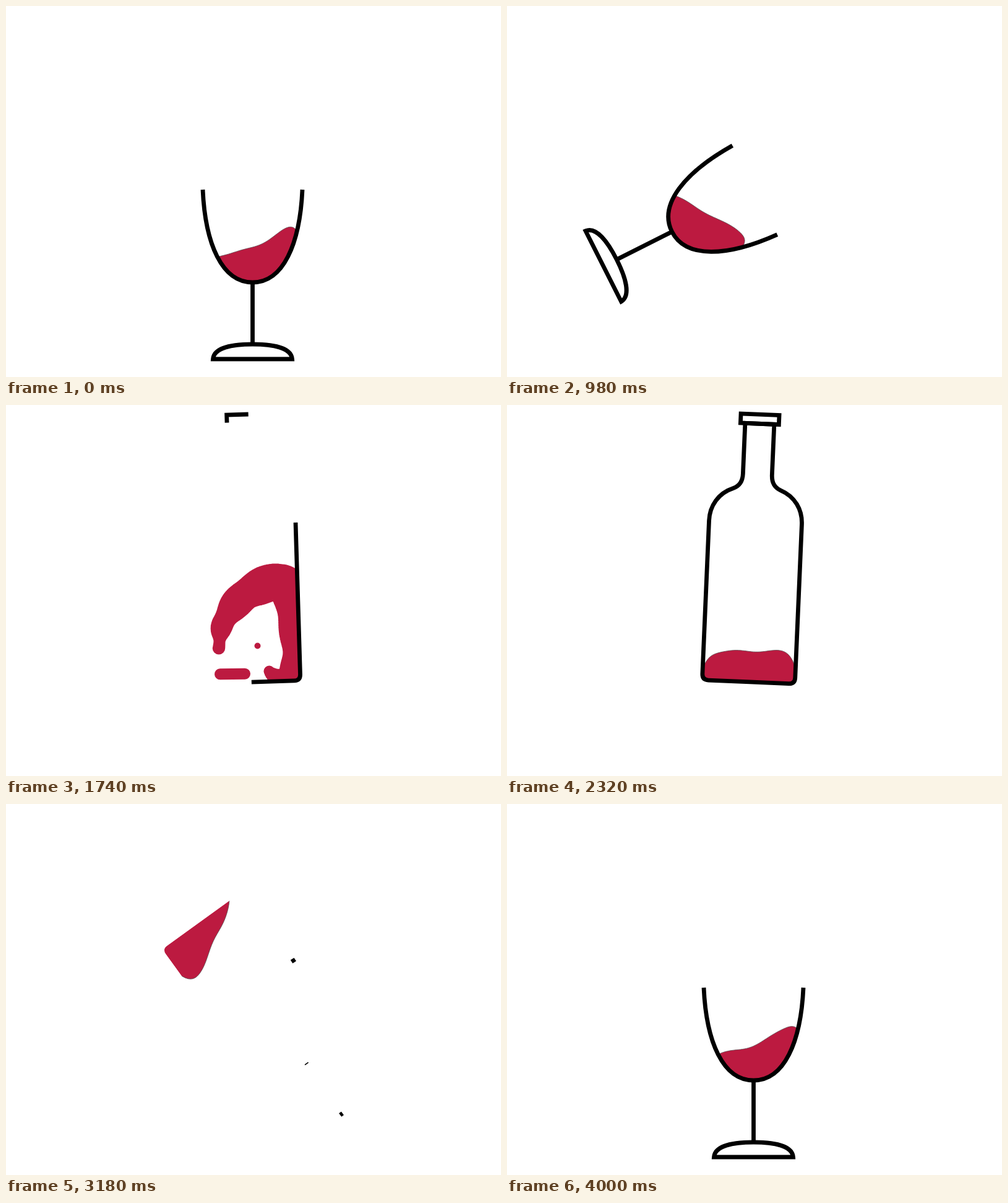
An HTML page for the animation above (4.02 s loop, 800x600 px).

```html
<!DOCTYPE html>
<html lang="en">
<head>
<meta charset="utf-8">
<title>Wine pour</title>
<style>
  html, body { margin: 0; width: 100%; height: 100%; overflow: hidden; background: #fff; }
  svg { display: block; width: 800px; height: 600px; }
  .line { fill: none; stroke: #000; stroke-width: 6.8; }
  .wine { fill: #bc1a40; }
  .pool { stroke: #5a4a4e; stroke-width: .8; }
</style>
</head>
<body>
<svg viewBox="0 0 800 600">
  <defs>
    <clipPath id="inGlass"><path d="M318,297C322,385 349,447 398.5,447C448,447 475,385 479,297V100H318Z"/></clipPath>
    <clipPath id="inBottle"><path/></clipPath>
    <clipPath id="inFlow"><path/></clipPath>
  </defs>
  <g class="wine">
    <g id="flowBox"><path id="flow"/></g>
    <rect id="puddle" x="337" width="58" rx="9" transform="rotate(-1 366 435)"/>
    <circle id="drop"/>
  </g>
  <g id="glass">
    <path class="wine pool" clip-path="url(#inGlass)"/>
    <path class="line" pathLength="1" d="M479,297C475,385 448,447 398.5,447C349,447 322,385 318,297"/>
    <path class="line" pathLength="1" d="M398.5,447V546"/>
    <path class="line" pathLength="1" d="M398.5,547C365,547 336,553 334.5,571H462.5C461,553 432,547 398.5,547Z"/>
  </g>
  <g id="bottle">
    <path class="wine pool" clip-path="url(#inBottle)"/>
    <path class="line" pathLength="1" d="M-4,142H65Q75,142 75,132V-116C75,-140 62,-161 38,-170C28,-174 23.5,-182 23.5,-194V-276H-23.5V-194C-23.5,-182 -28,-174 -38,-170C-62,-161 -75,-140 -75,-116V132Q-75,142 -65,142Z"/>
    <path class="line" pathLength="1" d="M4,-291H-31V-276H31V-291Z"/>
  </g>
</svg>
<script>
const LOOP = 4020, HALF = 2000, STEP = 20;
const $ = id => document.getElementById(id);
const clamp = u => Math.min(1, Math.max(0, u));
const ease = (t, from, to) => {
  const u = clamp((t - from) / (to - from));
  return u * u * (3 - 2 * u);
};

// cubic-bezier(.875, 0, .167, 1), solved by bisection.
function swing(x) {
  let lo = 0, hi = 1;
  for (let i = 0; i < 30; i++) {
    const s = (lo + hi) / 2, r = 1 - s;
    if (3 * .875 * s * r * r + 3 * .167 * s * s * r + s ** 3 < x) lo = s; else hi = s;
  }
  return lo * lo * (3 - 2 * lo);
}

// Both vessels share one turn, half of it in each half of the loop.
const angle = t => 180 * (swing(clamp(t / HALF)) + swing(clamp(t / HALF - 1)));

// Wine at rest in a vessel: time, depth, slope and bend of its surface.
const POOL = [
  [0, 57, -.4, -.0034], [300, 52, .15], [600, 53, -.2], [980, 65, -.68], [1180, 42, -.6], [1400, -25, 0],
  [1740, -25, 0], [1980, 48, .2], [2160, 50, -.12], [2320, 50, -.05], [2600, 50, .04], [2880, 49, -.27],
  [3180, 39, -.58], [3400, -25, 0], [3600, -25, 0], [3820, 46, .1], [4000, 57, -.4, -.0034]
];

function poolAt(t) {
  const i = POOL.findIndex(k => k[0] > t);
  if (i < 0) return POOL[POOL.length - 1].slice(1);
  const a = POOL[i - 1], b = POOL[i], u = ease(t, a[0], b[0]);
  return [1, 2, 3].map(j => (a[j] ?? 0) * (1 - u) + (b[j] ?? 0) * u);
}

function poolPath(t, axis, base) {
  const [depth, slope, bend] = poolAt(t);
  if (depth < -24) return "";
  let d = `M${axis - 90},${base + 20}`;
  for (let x = -90; x <= 90; x += 3) {
    const rim = 20 * (x / 72) ** 8, ripple = 1.5 * Math.sin(x / 11 + t / 120);
    d += `L${axis + x},${base - depth + slope * x + bend * x * x + rim + ripple}`;
  }
  return d + `V${base + 20}Z`;
}

// Wine in the air: a tapered stream that runs along a curve.
const SPAN = 800;
const POURS = [
  { at: 1180, way: [[345, 215], [390, 320], [425, 430], [462, 425], [468, 360], [450, 288], [390, 305], [352, 350], [344, 393], [340, 432]] },
  { at: 3190, way: [[330, 215], [375, 290], [405, 400], [432, 402], [450, 360], [460, 300], [456, 240], [440, 330], [405, 405]] }
];

function along(way, s) {
  const i = Math.min(Math.floor(s), way.length - 2), u = s - i;
  const [a, b, c, d] = [-1, 0, 1, 2].map(k => way[Math.min(way.length - 1, Math.max(0, i + k))]);
  return [0, 1].map(j => b[j] + u * (c[j] - a[j]) / 2
    + u * u * (a[j] - 2.5 * b[j] + 2 * c[j] - d[j] / 2)
    + u ** 3 * (3 * b[j] - a[j] - 3 * c[j] + d[j]) / 2);
}

function flowPath(t, { at, way }) {
  const u = (t - at) / SPAN, end = way.length - 1;
  if (u <= 0 || u >= 1) return "";
  const head = end * clamp(u / .787), tail = end * u ** 4.2, size = clamp((head - tail) / 3);
  let d = "";
  for (let i = 0; i <= 120; i++) {
    const v = i / 120, [x, y] = along(way, tail + (head - tail) * v);
    const r = size * (9 + 21 * Math.max(0, Math.sin(Math.PI * v)) ** 1.2 + 1.5 * Math.sin(v * 45));
    d += `M${x - r},${y}a${r},${r} 0 1 1 ${2 * r},0a${r},${r} 0 1 1 ${-2 * r},0`;
  }
  return d;
}

function trim(id, p) {
  for (const el of $(id).querySelectorAll(".line")) {
    el.style.display = p > .001 ? "" : "none";
    if (p >= 1) el.removeAttribute("stroke-dasharray");
    else el.setAttribute("stroke-dasharray", p + " 2");
  }
}

const setPool = (id, d) => $(id).querySelector(".pool").setAttribute("d", d);
const glassShape = $("inGlass").firstElementChild.getAttribute("d");
const bottleShape = $("bottle").querySelector(".line").getAttribute("d");
$("inBottle").firstElementChild.setAttribute("d", bottleShape);

function draw(t) {
  const turn = angle(t);
  const glassPose = `rotate(${turn} 399 299)`;
  const bottlePose = `translate(396.5 306) rotate(${turn - 180})`;
  $("glass").setAttribute("transform", glassPose);
  $("bottle").setAttribute("transform", bottlePose);
  trim("glass", t < HALF ? 1 - ease(t, 1080, 1178) : ease(t, 3130, 3780));
  trim("bottle", t < 2500 ? ease(t, 1518, 2118) : 1 - ease(t, 3080, 3178));

  const held = t < 1500 || t > 3500;
  setPool("glass", held ? poolPath(t, 398.5, 447) : "");
  setPool("bottle", held ? "" : poolPath(t, 0, 142));

  // A stream is bounded by the vessel it runs into.
  const toBottle = t < 2500, pour = POURS[toBottle ? 0 : 1], walls = $("inFlow").firstElementChild;
  walls.setAttribute("d", toBottle ? bottleShape : glassShape);
  walls.setAttribute("transform", toBottle ? bottlePose : glassPose);
  $("flowBox").setAttribute("clip-path", t > pour.at + SPAN / 2 ? "url(#inFlow)" : "none");
  $("flow").setAttribute("d", flowPath(t, pour));

  // Splash beside the main wave.
  const dt = t - 1740, size = Math.abs(dt) < 100 ? Math.cos(dt * Math.PI / 200) : 0;
  $("puddle").setAttribute("y", 444 - 18 * size);
  $("puddle").setAttribute("height", 18 * size);
  $("drop").setAttribute("cx", 406.5 - dt * .1);
  $("drop").setAttribute("cy", 389.5 + dt * .2);
  $("drop").setAttribute("r", 5 * size);
}

const start = performance.now();
function tick() {
  const t = (performance.now() - start) % LOOP;
  draw(Math.floor(t / STEP) * STEP);
  requestAnimationFrame(tick);
}
tick();
</script>
</body>
</html>
```
